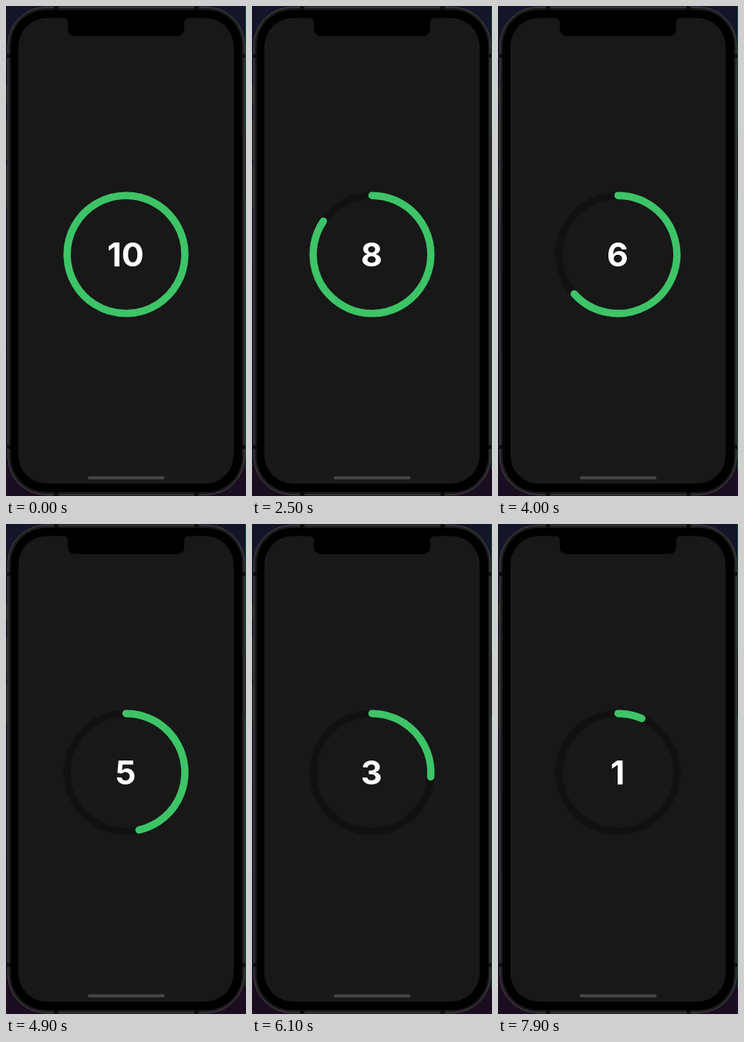
An HTML page for the animation above (8 s loop, 311 by 634 pixels).

```html
<!DOCTYPE html>
<html lang="en">
<head>
<meta charset="utf-8">
<title>Countdown</title>
<style>
  html, body { margin: 0; width: 100%; height: 100%; overflow: hidden; background: #14131f; }
  svg { display: block; }
  .ring { fill: none; stroke-width: 9.5; }
  #count { font: 700 43px Inter, Roboto, sans-serif; fill: #fff; text-anchor: middle; }
</style>
</head>
<body>
<svg width="311" height="634" viewBox="0 0 311 634">
  <defs>
    <linearGradient id="desk" x2="0" y2="1">
      <stop offset="0" stop-color="#14152a"/>
      <stop offset=".5" stop-color="#1b1926"/>
      <stop offset="1" stop-color="#1a0d20"/>
    </linearGradient>
  </defs>
  <rect width="311" height="634" fill="url(#desk)"/>
  <rect x="310" width="1" height="600" fill="#0c4a2a"/>

  <!-- side buttons -->
  <g fill="#222" stroke="#3a3a3a" stroke-width=".6">
    <rect x="-1" y="104.500" width="5" height="20"/>
    <rect x="-1" y="148.500" width="5" height="50"/>
    <rect x="-1" y="208.500" width="5" height="50"/>
  </g>
  <rect x="309" y="165" width="2" height="83" fill="#17251c"/>

  <!-- body -->
  <rect x="2.500" y="1.500" width="306.500" height="631" rx="49" fill="#1d1d1d" stroke="#484848"/>
  <g fill="#0d0d0d">
    <path d="M62 1h6v4h-6zM244 1h6v4h-6zM62 629h6v4h-6zM244 629h6v4h-6z"/>
    <path d="M2 62h4v5h-4zM2 568h4v5h-4zM306 62h4v5h-4zM306 568h4v5h-4z"/>
  </g>
  <rect x="6" y="5" width="300" height="624" rx="46" fill="#000"/>
  <rect x="16" y="15.500" width="279" height="602.500" rx="37" fill="#181818"/>
  <path d="M75 15H236V16Q231 16 231 21V28Q231 39 220 39H91Q80 39 80 28V21Q80 16 75 16Z" fill="#000"/>
  <rect x="106" y="608.500" width="99.500" height="4" rx="2" fill="#464646"/>

  <circle class="ring" cx="155.500" cy="321.500" r="76.300" stroke="#111"/>
  <path class="ring" id="arc" stroke="#3dc467" stroke-linecap="round"/>
  <text id="count" x="155" y="337">10</text>
</svg>
<script>
  const LOOP = 8000, DURATION = 10000, LEAD = 280;
  const CX = 155.5, CY = 321.5, R = 76.3;
  const arc = document.getElementById('arc');
  const count = document.getElementById('count');

  const easeInOutQuad = u => u < .5 ? 2 * u * u : 1 - 2 * (1 - u) ** 2;
  const point = a => `${CX + R * Math.sin(a)} ${CY - R * Math.cos(a)}`;

  function draw(now) {
    const left = 1 - easeInOutQuad((now % LOOP + LEAD) / DURATION);
    const end = left * 2 * Math.PI;
    const to = a => `A${R} ${R} 0 0 1 ${point(a)}`;
    arc.setAttribute('d', `M${point(0)}${to(end / 3)}${to(end * 2 / 3)}${to(end)}`);
    const label = String(Math.round(left * 10));
    if (count.textContent !== label) count.textContent = label;
    requestAnimationFrame(draw);
  }
  draw(performance.now());
</script>
</body>
</html>
```
